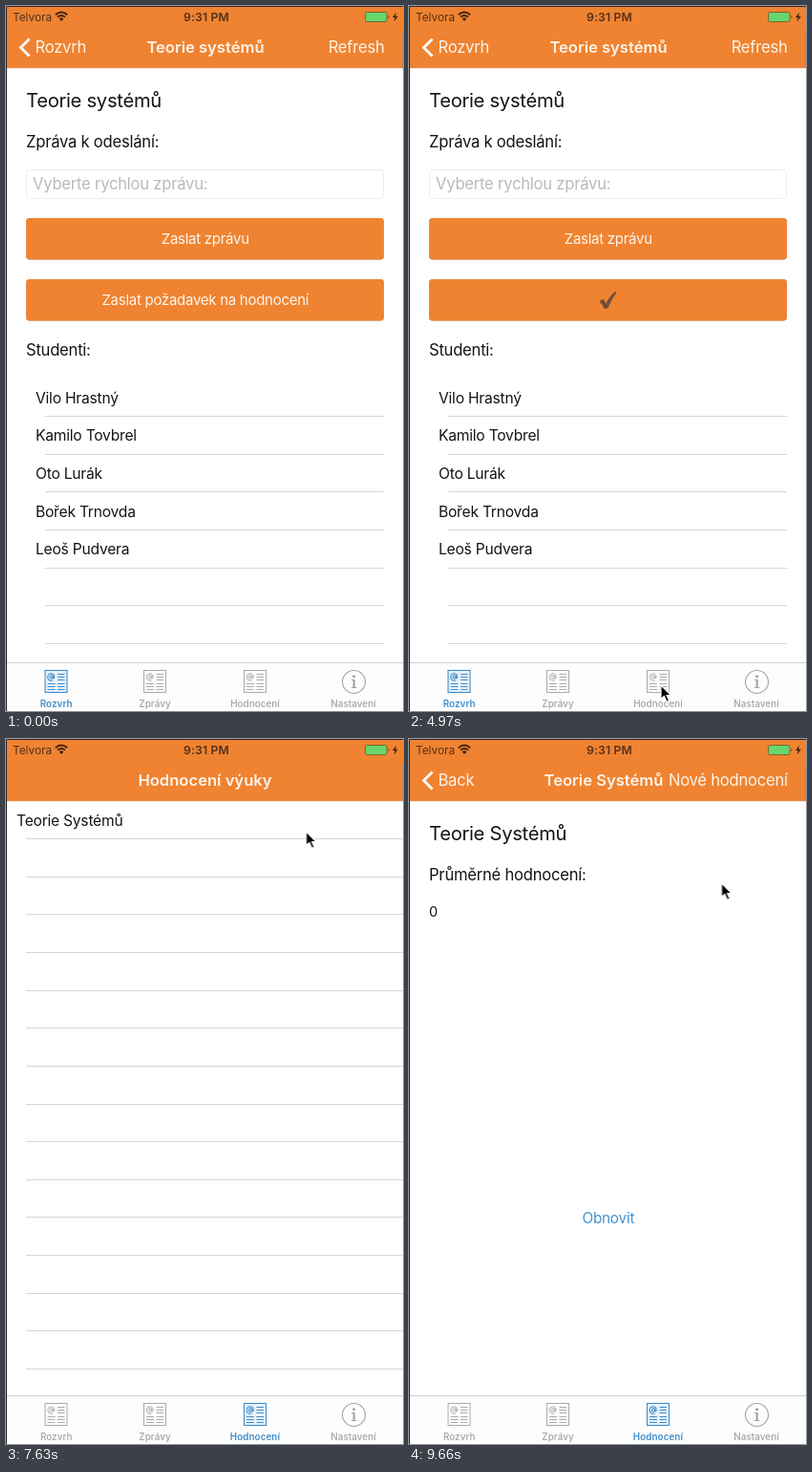
An HTML page that plays this animation: 416 by 738 pixels, repeating every 9.73 s.

```html
<!DOCTYPE html>
<html lang="cs">
<head>
<meta charset="utf-8">
<title>Hodnocení výuky</title>
<style>
html, body { margin: 0; width: 100%; height: 100%; overflow: hidden; background: #fff; }
svg { display: block; width: 416px; height: 738px; }
text { font-family: Inter, "Open Sans", sans-serif; font-size: 16.6px; letter-spacing: -.014em; fill: #141414; }
.heading { font-size: 20.2px; }
.row { font-size: 15.6px; }
.button text { font-size: 15px; letter-spacing: -.018em; fill: #fff6ee; text-anchor: middle; }
.button rect { fill: #ef8331; filter: drop-shadow(.5px .5px 0 #a09a96); }
.nav text { fill: #fff4ea; }
.nav .title { font-weight: 600; letter-spacing: 0; text-anchor: middle; }
.end { text-anchor: end; }
.rules { fill: none; stroke: #d6d6d6; }
.tab { color: #a2a2a2; stroke-width: .9; fill-opacity: 0; }
.tab text { font-size: 9.8px; font-weight: 500; letter-spacing: .01em; text-anchor: middle; fill: currentColor; }
.tab text, .tab .info { fill-opacity: 1; }
.status text { font-size: 11.8px; letter-spacing: 0; fill: #54311b; }
.status .clock { font-size: 12.2px; font-weight: 600; letter-spacing: .015em; text-anchor: middle; }

.lessons, .ratings, .detail, .list, .cell, .empty, .press, .nav-list, .nav-detail, .slide-title,
.label, .check, .pointer, .tab-lessons, .tab-ratings { animation: 9.73s linear infinite; }

.lessons { animation-name: lessons; }
@keyframes lessons { 0%, 53.2% { visibility: visible } 53.21%, 100% { visibility: hidden } }
.ratings { animation-name: ratings; }
@keyframes ratings { 0%, 53.2% { visibility: hidden } 53.21%, 100% { visibility: visible } }

.tab-lessons { animation-name: tab-lessons; }
@keyframes tab-lessons {
  0%, 53.2% { color: #3f8dca; font-weight: 600; fill-opacity: .1; stroke-width: 1.1 }
  53.21%, 100% { color: #a2a2a2; font-weight: 500; fill-opacity: 0; stroke-width: .9 }
}
.tab-ratings { animation-name: tab-ratings; }
@keyframes tab-ratings {
  0%, 53.2% { color: #a2a2a2; font-weight: 500; fill-opacity: 0; stroke-width: .9 }
  53.21%, 100% { color: #3f8dca; font-weight: 600; fill-opacity: .1; stroke-width: 1.1 }
}
.tab-lessons text, .tab-ratings text { font-weight: inherit; }

.label { animation-name: label; }
@keyframes label { 0%, 18.7% { opacity: 1 } 20.6%, 100% { opacity: 0 } }
.check { animation-name: check; }
@keyframes check { 0%, 21% { opacity: 0 } 23.5%, 100% { opacity: 1 } }

/* the first row settles while the empty rows close up */
.cell { animation-name: cell; }
@keyframes cell {
  0%, 56.5% { transform: translateY(14px); opacity: 0 }
  59% { transform: translateY(8px); opacity: .85 }
  61%, 100% { transform: none; opacity: 1 }
}
.empty { animation-name: empty; transform-origin: 0 143.8px; }
@keyframes empty {
  0%, 59% { transform: translateY(3.7px) scaleY(1.0139) }
  61%, 100% { transform: translateY(0) scaleY(1) }
}
.press { animation-name: press; }
@keyframes press { 0%, 78.9% { opacity: 0 } 79%, 100% { opacity: 1 } }

/* page push */
.list, .detail, .nav-list, .nav-detail, .slide-title { animation-timing-function: cubic-bezier(.2, .8, .2, 1); }
.list { animation-name: list; }
@keyframes list { 0%, 79.2% { transform: none } 84.6%, 100% { transform: translateX(-125px) } }
.detail { animation-name: detail; }
@keyframes detail { 0%, 79.2% { transform: translateX(416px) } 84.6%, 100% { transform: none } }
.nav-list { animation-name: nav-list; }
@keyframes nav-list { 0%, 79.2% { transform: none; opacity: 1 } 83%, 100% { transform: translateX(-130px); opacity: 0 } }
.nav-detail { animation-name: nav-detail; }
@keyframes nav-detail { 0%, 79.2% { opacity: 0 } 83%, 100% { opacity: 1 } }
.slide-title { animation-name: slide-title; }
@keyframes slide-title { 0%, 79.2% { transform: translateX(150px) } 83%, 100% { transform: none } }

.pointer { animation-name: pointer; animation-timing-function: ease-in-out; }
@keyframes pointer {
  0%, 9.2% { transform: translate(425px, 330px) }
  15.5%, 26.7% { transform: translate(354.5px, 310px) }
  47%, 62.7% { transform: translate(264px, 711px) }
  75%, 85% { transform: translate(314.5px, 97px) }
  95%, 100% { transform: translate(327.5px, 151px) }
}
</style>
</head>
<body>
<svg viewBox="0 0 416 738">
  <defs>
    <g id="sheet" fill="none" stroke="currentColor">
      <rect x="-11.5" y="-11.5" width="23" height="23" fill="currentColor"/>
      <circle cx="-5" cy="-4.5" r="1.6"/>
      <path d="M-3.4 -6.2v2.2q.2 1.4 1.4 .6q.8 -4.6 -3 -4.8q-3.7 .2 -3.8 3.7q.2 3.8 3.8 3.7l1.6 -.4"/>
      <path d="M1.5 -7.5h7.5M1.5 -4.5h7.5M1.5 -1.5h7.5M-9 2.5h8M1.5 2.5h7.5M-9 5.5h8M1.5 5.5h7.5M-9 8.5h8M1.5 8.5h7.5"/>
    </g>
    <path id="chevron" d="M24.5 34.5L15.5 43.5L24.5 52.5" fill="none" stroke="#fff" stroke-width="2.8"/>
  </defs>
  <rect width="416" height="738" fill="#fff"/>

  <g class="lessons">
    <text class="heading" x="21" y="106">Teorie systémů</text>
    <text x="21" y="148">Zpráva k odeslání:</text>
    <rect x="21.5" y="171.5" width="374" height="30" rx="4" fill="#fff" stroke="#ececec"/>
    <text x="28" y="192.3" style="fill:#b9b9b9">Vyberte rychlou zprávu:</text>
    <g class="button">
      <rect x="21" y="222" width="375" height="43.6" rx="4"/>
      <text x="208.8" y="249.3">Zaslat zprávu</text>
      <rect x="21" y="286" width="375" height="43.6" rx="4"/>
      <text class="label" x="208.8" y="313.3">Zaslat požadavek na hodnocení</text>
    </g>
    <path class="check" fill="#6f4e3b" d="M199.5 309.5q1.5 -2.5 4 -2.5q1.5 1 2.8 4.5q4.5 -8.5 9.7 -12.5l1.6 .8q-5.5 7 -9 16.2q-2 1.2 -4 .8q-2 -5 -5.1 -7.3z"/>
    <text x="21" y="366">Studenti:</text>
    <text class="row" x="31" y="415.5">Vilo Hrastný</text>
    <text class="row" x="31" y="455.2">Kamilo Tovbrel</text>
    <text class="row" x="31" y="494.8">Oto Lurák</text>
    <text class="row" x="31" y="534.5">Bořek Trnovda</text>
    <text class="row" x="31" y="574.1">Leoš Pudvera</text>
    <path class="rules" data-rules="41 396 429.5 7"/>
  </g>

  <g class="ratings">
    <g class="list">
      <path class="rules empty" data-rules="21 541 144.1 14"/>
      <g class="cell">
        <rect class="press" y="65" width="541" height="39" fill="#d9d9d9"/>
        <text class="row" x="11" y="90.5">Teorie Systémů</text>
        <path class="rules" d="M21 104.5H541"/>
      </g>
    </g>
    <g class="detail">
      <rect y="65" width="416" height="622" fill="#fff"/>
      <text class="heading" x="21" y="106">Teorie Systémů</text>
      <text x="21" y="148">Průměrné hodnocení:</text>
      <text x="21" y="185.5" style="font-size:14.5px">0</text>
      <text x="208.8" y="506.5" text-anchor="middle" style="font-size:15.3px;fill:#4390cc">Obnovit</text>
    </g>
  </g>

  <rect width="416" height="65" fill="#ef8331"/>
  <path d="M0 65.2H416" stroke="#d9c2b2" stroke-width=".4"/>
  <g class="nav">
    <g class="lessons">
      <use href="#chevron"/>
      <text x="30.5" y="49">Rozvrh</text>
      <text class="title" x="209" y="49">Teorie systémů</text>
      <text class="end" x="396.5" y="49">Refresh</text>
    </g>
    <g class="ratings">
      <g class="nav-list"><text class="title" x="208.5" y="49">Hodnocení výuky</text></g>
      <g class="nav-detail">
        <use href="#chevron"/>
        <text x="30.5" y="49">Back</text>
        <text class="title slide-title" x="204" y="49">Teorie Systémů</text>
        <text class="end" x="396.8" y="49">Nové hodnocení</text>
      </g>
    </g>
  </g>

  <g class="status">
    <text x="7" y="15.8">Telvora</text>
    <g fill="none" stroke="#3f2412" stroke-width="1.9">
      <path d="M51.8 9.2q6.2 -5.4 12.4 0M54 11.6q4 -3.4 8 0"/>
      <path d="M55.7 13.2q2.3 -1.8 4.6 0l-2.3 2.7z" fill="#3f2412" stroke="none"/>
    </g>
    <text class="clock" x="210" y="15.8">9:31 PM</text>
    <rect x="376.5" y="6.5" width="22.5" height="10" rx="2" fill="#66d66d" stroke="#83612f"/>
    <path d="M400.5 9.8q2 1.7 0 3.5z" fill="#6b4526"/>
    <path d="M409 6.5l-4 5.500h2.500l-1 4.500l4.300 -5.800h-2.700z" fill="#3f2412"/>
  </g>

  <rect y="687" width="416" height="51" fill="#fdfdfd"/>
  <path d="M0 687.5H416" stroke="#d0d0d0"/>
  <g class="tab tab-lessons"><use href="#sheet" x="52.5" y="707"/><text x="52.7" y="733.5">Rozvrh</text></g>
  <g class="tab"><use href="#sheet" x="156" y="707"/><text x="156" y="733.5">Zprávy</text></g>
  <g class="tab tab-ratings"><use href="#sheet" x="261" y="707"/><text x="261" y="733.5">Hodnocení</text></g>
  <g class="tab">
    <circle cx="364.5" cy="707.5" r="12" fill="none" stroke="currentColor" stroke-width="1.1"/>
    <g class="info" fill="currentColor">
      <path d="M362 705h3.7v8h1.6v1h-5.3v-1h1.6v-7h-1.6z"/>
      <circle cx="364.5" cy="701.8" r="1.5"/>
    </g>
    <text x="364" y="733.5">Nastavení</text>
  </g>

  <path d="M.5 738V.5H416" fill="none" stroke="#33252a"/>
  <path d="M415.5 27V65" stroke="#b98060"/>

  <g class="pointer">
    <path d="M0 0V14.5L3.4 11.4L6 17.3L8.6 16.2L6 10.5H10.5Z" fill="#000" stroke="#fff" stroke-width="1.1"/>
  </g>
</svg>
<script>
const ROW_HEIGHT = 39.65;
for (const path of document.querySelectorAll('[data-rules]')) {
  const [left, right, top, count] = path.dataset.rules.split(' ').map(Number);
  const rule = (_, i) => `M${left} ${Math.floor(top + i * ROW_HEIGHT) + 0.5}H${right}`;
  path.setAttribute('d', Array.from({ length: count }, rule).join(''));
}
</script>
</body>
</html>
```
